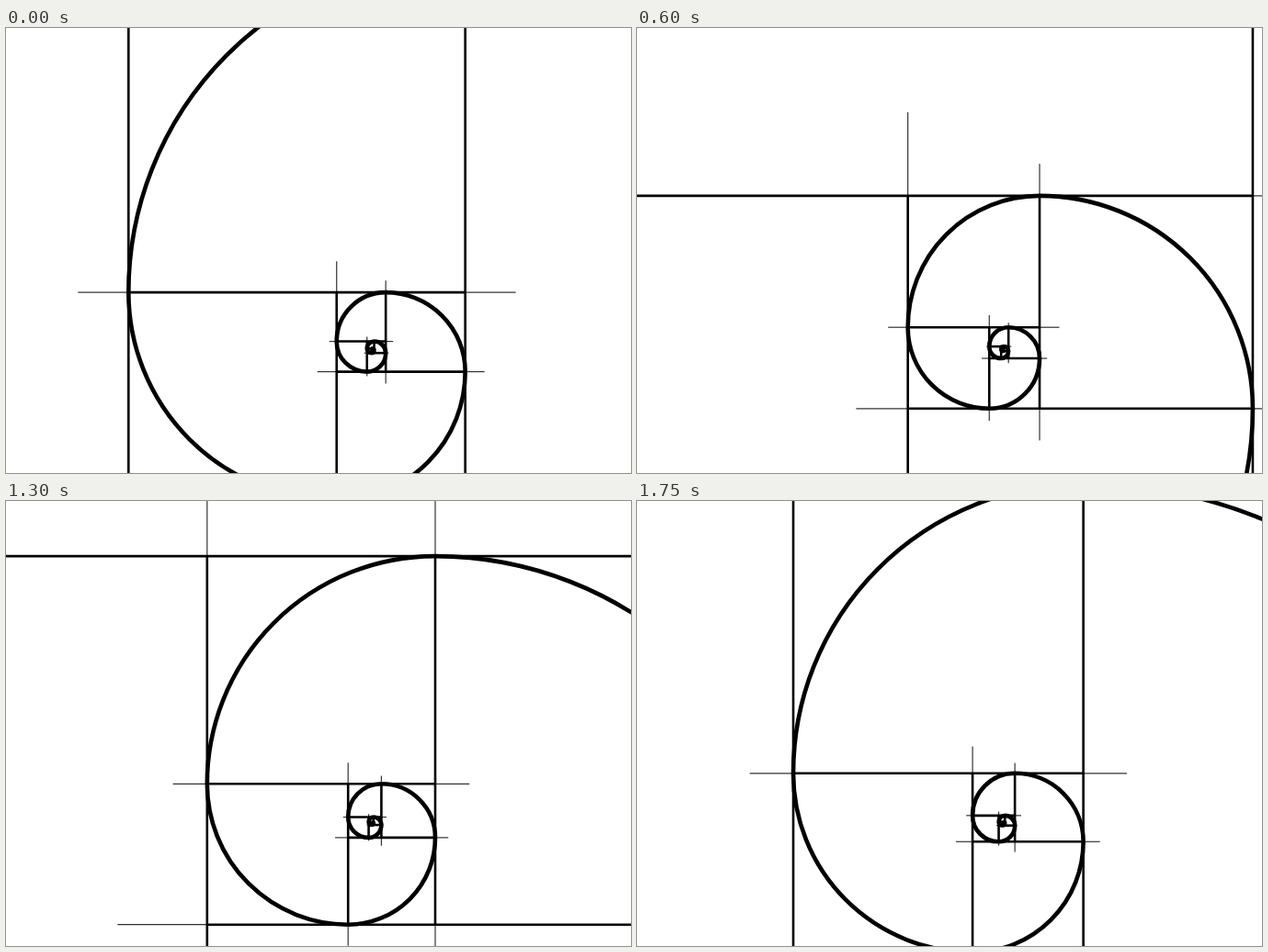
Recreate the animation shown at these times as an HTML page with a canvas. Size 680 by 485 pixels, loop 1.8 s.

```html
<!DOCTYPE html>
<html lang="en">
<head>
<meta charset="utf-8">
<title>Golden spiral zoom</title>
<style>
  html, body { margin: 0; width: 100%; height: 100%; overflow: hidden; background: #fff; }
  canvas { display: block; }
</style>
</head>
<body>
<canvas id="stage" width="680" height="485"></canvas>
<script>
const ctx = document.getElementById("stage").getContext("2d");
const PHI = (1 + Math.sqrt(5)) / 2;
const POLE = { x: 398.4, y: 350.7 };
const STEP = 50, STEPS = 36;
const START = 53.45, GROWTH = 7.49;

// Offsets from the pole to a square's inner corner, per unit of side
const RIGHT = (5 - Math.sqrt(5)) / 10;
const BOTTOM = -RIGHT / PHI;
const OVERHANG = 0.15;

function line(x1, x2, y, width, color) {
  ctx.beginPath();
  ctx.moveTo(x1, y);
  ctx.lineTo(x2, y);
  ctx.lineWidth = width;
  ctx.strokeStyle = color;
  ctx.stroke();
}

// One square of the tiling: its dividing edge, thin overhangs and quarter arc
function drawLevel(side, turn) {
  const right = RIGHT * side, left = right - side, y = BOTTOM * side;
  const over = OVERHANG * side;
  ctx.save();
  ctx.translate(POLE.x, POLE.y);
  ctx.rotate(turn * Math.PI / 2);
  line(left - over, left, y, 1.2, "#333");
  line(right, right + over, y, 1.2, "#333");
  line(left, right, y, 2.6, "#000");
  ctx.beginPath();
  ctx.arc(right, y, side, Math.PI - 0.002, Math.PI * 1.5 + 0.002);
  ctx.lineWidth = 4.6;
  ctx.stroke();
  ctx.restore();
}

function draw(time) {
  const step = Math.floor(time / STEP) % STEPS;
  const base = START + GROWTH * step;
  ctx.fillStyle = "#fff";
  ctx.fillRect(0, 0, 680, 485);
  for (let k = -12; k <= 9; k++) {
    const side = base * PHI ** k;
    if (side > 1) drawLevel(side, k);
  }
}

const began = performance.now();
function tick() {
  draw(performance.now() - began);
  requestAnimationFrame(tick);
}
tick();
</script>
</body>
</html>
```
